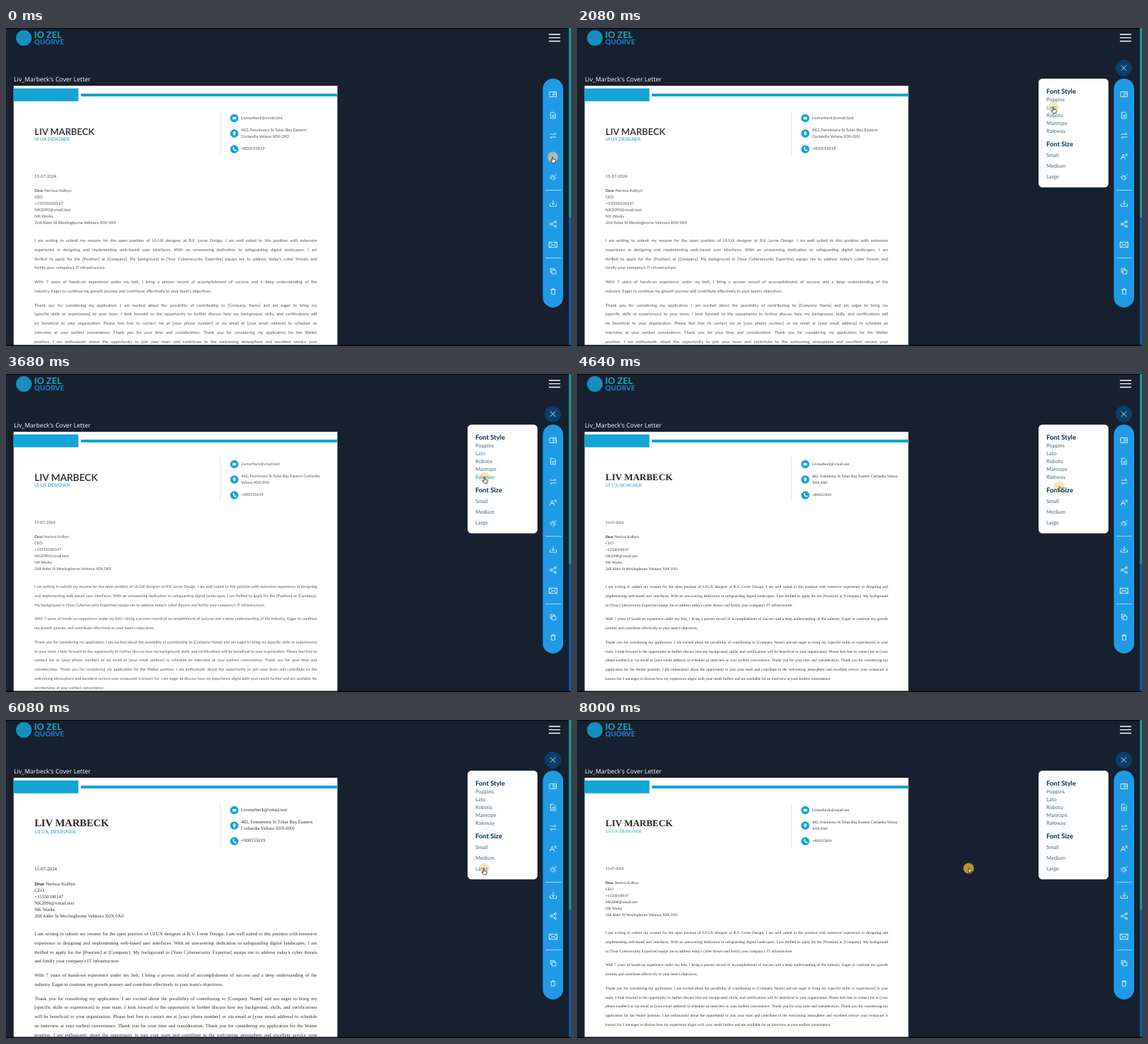
An HTML page that plays this animation: 792 by 446 pixels, repeating every 8240 ms.

```html
<!DOCTYPE html>
<html lang="en">
<head>
<meta charset="utf-8">
<title>Cover letter font picker</title>
<style>
  html, body { margin: 0; width: 100%; height: 100%; overflow: hidden; background: #17202e; }
  #stage { position: relative; width: 792px; height: 446px; overflow: hidden; text-rendering: geometricPrecision; }
  svg, .letter { position: absolute; left: 0; top: 0; width: 792px; height: 446px; }
  svg { font-family: Lato, sans-serif; }
  .row { position: absolute; margin-top: .5px; line-height: 0; white-space: nowrap; }
  .full { width: 396px; text-align: justify; text-align-last: justify; }
  .name { color: #26282b; }
  .role { color: #1593c4; }
  .icon { fill: none; stroke: #e4f2fd; stroke-width: .9; stroke-linejoin: round; stroke-linecap: round; }
</style>
</head>
<body>
<div id="stage">
  <svg viewBox="0 0 792 446">
    <rect width="792" height="446" fill="#17202e"/>
    <circle cx="25" cy="14" r="11" fill="#168fc0"/>
    <g font-weight="800">
      <text x="39.5" y="14.3" font-size="12.6" fill="#1d9fb8">IO ZEL</text>
      <text x="39.5" y="23.4" font-size="9.8" fill="#1880c9">QUORVE</text>
    </g>
    <path d="M761 9h16M761 13.700h16M761 18.500h16" stroke="#fff" stroke-width="1.3"/>
    <text x="11" y="74.8" font-size="8.7" fill="#fff" font-family="Open Sans, sans-serif">Liv_Marbeck's Cover Letter</text>
    <rect x="10.700" y="81" width="453.800" height="364" fill="#fff"/>
    <path d="M10.700 84.700h90.800v18h-90.800zM105 92h359.500v4H105z" fill="#11a5d6"/>
    <path d="M300.5 117v62" stroke="#dcdfe2" stroke-width=".8"/>
    <g fill="#13a4d5">
      <circle cx="320" cy="126.5" r="5.8"/><circle cx="320" cy="148" r="5.8"/><circle cx="320" cy="170" r="5.8"/>
    </g>
    <g fill="#fff">
      <rect x="317.6" y="124.8" width="4.8" height="3.5" rx=".5"/>
      <path d="M320 151c-3-3.500-2-5.800 0-5.800s3 2.300 0 5.800z"/>
      <path d="M318 167.400l1-.6 1 1.700-.6.8 1.600 1.600.8-.6 1.500 1-.6 1.100c-2 .8-5.500-2.700-4.700-5z"/>
    </g>
    <circle cx="320" cy="147.200" r=".8" fill="#13a4d5"/>
  </svg>

  <div id="letters"></div>

  <svg viewBox="0 0 792 446">
    <g id="panel">
      <rect x="647" y="71" width="98" height="152.500" rx="5.500" fill="#fff"/>
      <g font-size="9.2" font-weight="800" fill="#143c62">
        <text x="658" y="91.500">Font Style</text>
        <text x="658" y="166.200">Font Size</text>
      </g>
      <g id="items" font-size="7.4"></g>
      <circle cx="766.500" cy="56" r="11.500" fill="#0a3e6b"/>
      <path class="icon" d="M763 52.500l7 7m0-7l-7 7"/>
    </g>
    <rect x="752.500" y="71" width="28.500" height="321" rx="14.200" fill="#1f9be6"/>
    <path d="M756 227.500h22M756 322.500h22" stroke="#b5ddf8" stroke-width=".9"/>
    <g id="icons" class="icon"></g>
    <rect id="pill" y="169.500" height="21.500" rx="10.700" fill="#1f9be6"/>
    <path id="letterIcon" class="icon" d="M-4.500 3.500L-1.500-3.500 1.500 3.500M-3.500 1h4M1.500-3.500h3M2-1.400h2.500"/>
    <text id="tip" y="183.200" font-size="7.6" font-weight="500" fill="#fff">Font Style</text>
    <path d="M789 0h3v266h-3z" fill="#159c99"/>
    <path d="M789 266h3v180h-3z" fill="#0d5cae"/>
    <path d="M0 0h789v1.200H0zM0 444.500h792v1.500H0z" fill="#05070b"/>
    <g id="cursor">
      <circle id="halo" r="7.500"/>
      <g fill="#fff" stroke="#222" stroke-width=".8" stroke-linejoin="round">
        <path id="hand" d="M-1 0q.8-.8 1.400 0v3l3 .8q.8.400.6 1.500l-.6 3h-4l-2.600-3.300q.3-1 1.200-.4l1 .7z"/>
        <path id="arrow" d="M0-.5v7l1.600-1.500 1.200 2.600 1-.5-1.200-2.500h2.200z"/>
      </g>
    </g>
  </svg>
</div>

<script>
const $ = id => document.getElementById(id);
const LOOP = 8240, STEP = 80, LAST = 8000;

const paragraphs = [
  "I am writing to submit my resume for the open position of UI/UX designer at R.V. Lorne Design. I am well suited to this position with extensive experience in designing and implementing web-based user interfaces. With an unwavering dedication to safeguarding digital landscapes, I am thrilled to apply for the [Position] at [Company]. My background in [Your Cybersecurity Expertise] equips me to address today's cyber threats and fortify your company's IT infrastructure.",
  "With 7 years of hands-on experience under my belt, I bring a proven record of accomplishment of success and a deep understanding of the industry. Eager to continue my growth journey and contribute effectively to your team's objectives.",
  "Thank you for considering my application. I am excited about the possibility of contributing to [Company Name] and am eager to bring my [specific skills or experiences] to your team. I look forward to the opportunity to further discuss how my background, skills, and certifications will be beneficial to your organization. Please feel free to contact me at [your phone number] or via email at [your email address] to schedule an interview at your earliest convenience. Thank you for your time and consideration. Thank you for considering my application for the Waiter position. I am enthusiastic about the opportunity to join your team and contribute to the welcoming atmosphere and excellent service your restaurant is known for. I am eager to discuss how my experience aligns with your needs further and am available for an interview at your earliest convenience."
];
const address = "482, Fennimora St Tolan Bay Eastern Corlandia Velona X0X-0X0";
const recipient = ["<b>Dear</b> Nerissa Kolbyn", "CEO", "+15550100147", "NK2090@vmail.test", "NK Works",
  "268 Alder St Wexlingborne Velmora X0X 0X0"];

// Each style names the words that begin a new line: address first, then the paragraphs.
const sans = { font: "Lato, sans-serif", color: "#505458", weight: 600, shift: 0 };
const serif = { font: "Liberation Serif, serif", color: "#2c2e31", weight: 700, shift: 0 };
const styles = {
  poppins: { ...sans, size: 5.75, name: 12.9, role: 6.3, breaks: [
    ["Corlandia"], ["experience", "thrilled", "fortify"], ["industry."],
    ["[specific", "be beneficial", "interview", "position.", "restaurant"]] },
  lato: { ...sans, size: 5.42, name: 13.6, role: 6.4, breaks: [
    ["Velona"], ["and implementing", "My background"], ["my growth"],
    ["to your team", "contact me", "consideration.", "welcoming", "an interview"]] },
  serif: { ...serif, size: 5.4, name: 13, role: 6.4, breaks: [
    ["X0X"], ["implementing", "in [Your"], ["journey"],
    ["team.", "phone", "application for", "known"]] },
  serifLarge: { ...serif, size: 6.68, name: 14.4, role: 7.3, shift: 2, breaks: [
    ["Corlandia"], ["experience", "thrilled", "and fortify"], ["industry."],
    ["[specific", "will be", "an interview", "position.", "restaurant"]] }
};

function wrap(text, starts) {
  const lines = [];
  let from = 0;
  for (const start of starts) {
    const at = text.indexOf(" " + start, from);
    lines.push(text.slice(from, at));
    from = at + 1;
  }
  return [...lines, text.slice(from)];
}

function buildLetter({ font, color, size, name, weight, role, shift, breaks }) {
  const letter = document.createElement("div");
  letter.className = "letter";
  Object.assign(letter.style, { fontFamily: font, fontSize: size + "px", color });
  const row = (html, x, y, cls = "", css = "") => letter.insertAdjacentHTML("beforeend",
    `<div class="row ${cls}" style="left:${x}px;top:${y}px;${css}">${html}</div>`);

  row("LIV MARBECK", 40, 144, "name", `font-size:${name}px;font-weight:${weight}`);
  row("UI UX DESIGNER", 40, 156.1, "role", `font-size:${role}px`);
  row("Livmarbeck@vmail.test", 329.5, 126.6);
  wrap(address, breaks[0]).forEach((line, i) => row(line, 329.5, 143.2 + 9.1 * i));
  row("+000555019", 329.5, 169.8);
  row("15-07-2024", 40, 208.6 + shift / 2);
  recipient.forEach((line, i) => row(line, 40, 228 + shift + 9.1 * i));

  let y = 298.5 + shift;
  paragraphs.forEach((text, p) => {
    const lines = wrap(text, breaks[p + 1]);
    lines.forEach((line, i) => {
      row(line, 40, y, i < lines.length - 1 ? "full" : "");
      y += 12.75;
    });
    y += 7.1;
  });
  $("letters").append(letter);
  return letter;
}

const letters = Object.fromEntries(Object.entries(styles).map(([key, style]) => [key, buildLetter(style)]));

const items = [["Poppins", 100.5], ["Lato", 111.7], ["Roboto", 122.6], ["Manrope", 133.5], ["Raleway", 144.5],
  ["Small", 178.7], ["Medium", 193.6], ["Large", 208.2]];
$("items").innerHTML = items.map(([label, y]) => `<text x="658" y="${y + 2.6}">${label}</text>`).join("");

const icons = [
  [93, "M-4.500-3.500h9v7h-9zM0-3.500v7M1.600-1.400h1.500M1.600.6h1.500"],
  [122.5, "M-3.200-4.300h4l2.400 2.400v6.200h-6.400zM-1.500 0h3M-1.500 2h3"],
  [151, "M-4-2h8l-2-2M4 2h-8l2 2"],
  [209.5, "M4.500-4.500l-3 3M-.5-3l4 4M-.5-3l-4 2.500 4.500 4.500 3.500-3M-1.800-2l4 4M-2.500.8l-1 1"],
  [246, "M0-4v5.500M-2.200-.5L0 1.700 2.200-.5M-4.500 1v3h9v-3"],
  [275, "M-1.500-.7l3.500-2M-1.500.7l3.500 2M-4.500 0a1.500 1.500 0 1 0 3 0a1.500 1.500 0 1 0-3 0M1.700-3.200a1.400 1.400 0 1 0 2.800 0a1.400 1.400 0 1 0-2.800 0M1.700 3.200a1.400 1.400 0 1 0 2.800 0a1.400 1.400 0 1 0-2.800 0"],
  [304, "M-5.300-3.700h10.600v7.400h-10.600zM-5.300-3.700L0 .7 5.300-3.700M-5.300 3.700l3.800-3.200M5.300 3.700l-3.800-3.200"],
  [341, "M-1.500-1.500h5.300v5.300h-5.300zM-1.500 1.500h-2.200v-5.200h5.200v2.200"],
  [369.5, "M-3-2.600h6M-2.400-2.600v6.300h4.800v-6.300M-1-2.600v-1.300h2v1.300"]
];
$("icons").innerHTML = icons.map(([y, d]) => `<path transform="translate(767 ${y})" d="${d}"/>`).join("");

const cursorPath = [[0, 766.5, 181], [480, 766.5, 181], [1040, 704, 144], [1200, 704, 144], [1680, 668, 108],
  [2240, 668, 112], [2800, 674, 134], [3200, 673, 134], [3680, 671, 145], [4160, 671, 145], [4640, 676, 158],
  [5360, 671, 193], [5680, 670, 208.5], [6240, 670, 208.5], [6800, 670, 194], [7280, 670, 180],
  [7520, 670, 180], [7920, 549, 208], [8240, 549, 208]];
const styleChanges = [[0, "poppins"], [2240, "lato"], [3760, "serif"], [5760, "serifLarge"], [7440, "serif"]];

const ease = (t, from, to) => {
  const p = Math.min(1, Math.max(0, (t - from) / (to - from)));
  return p * p * (3 - 2 * p);
};
const show = (el, visible) => { el.style.display = visible ? "" : "none"; };

function cursorAt(t) {
  const i = cursorPath.findIndex(key => key[0] > t);
  const [t0, x0, y0] = cursorPath[i - 1], [t1, x1, y1] = cursorPath[i];
  const p = ease(t, t0, t1);
  return [x0 + (x1 - x0) * p, y0 + (y1 - y0) * p];
}

function draw(t) {
  const current = styleChanges.filter(([start]) => start <= t).pop()[1];
  for (const key in letters) show(letters[key], key === current);
  show($("panel"), t >= 560);

  const open = ease(t, 80, 400) - ease(t, 1360, 1680);
  const left = 752.5 - 65.5 * open;
  $("pill").setAttribute("x", left);
  $("pill").setAttribute("width", 779 - left);
  show($("pill"), open > 0);
  $("letterIcon").setAttribute("transform", `translate(${767 - 70 * open} 180.5)`);
  $("tip").setAttribute("x", 775 - 70 * open);
  $("tip").setAttribute("opacity", open);

  const [x, y] = cursorAt(t);
  const inPanel = x > 647 && x < 745, onBar = x > 752;
  const hovered = inPanel ? items.findIndex(item => Math.abs(item[1] - y) < 6) : -1;
  [...$("items").children].forEach((el, i) => {
    const active = i === hovered || (i === 1 && current === "lato");
    el.setAttribute("fill", active ? "#2b94bd" : "#496983");
  });
  $("cursor").setAttribute("transform", `translate(${x} ${y})`);
  $("halo").setAttribute("fill", onBar ? "#c4bfa6" : "#e0b02c");
  $("halo").setAttribute("opacity", inPanel ? .32 : .8);
  show($("hand"), onBar || hovered >= 0);
  show($("arrow"), !onBar && hovered < 0);
}

function tick() {
  const t = performance.now() % LOOP;
  draw(Math.min(LAST, Math.floor(t / STEP) * STEP));
  requestAnimationFrame(tick);
}
tick();
</script>
</body>
</html>
```
